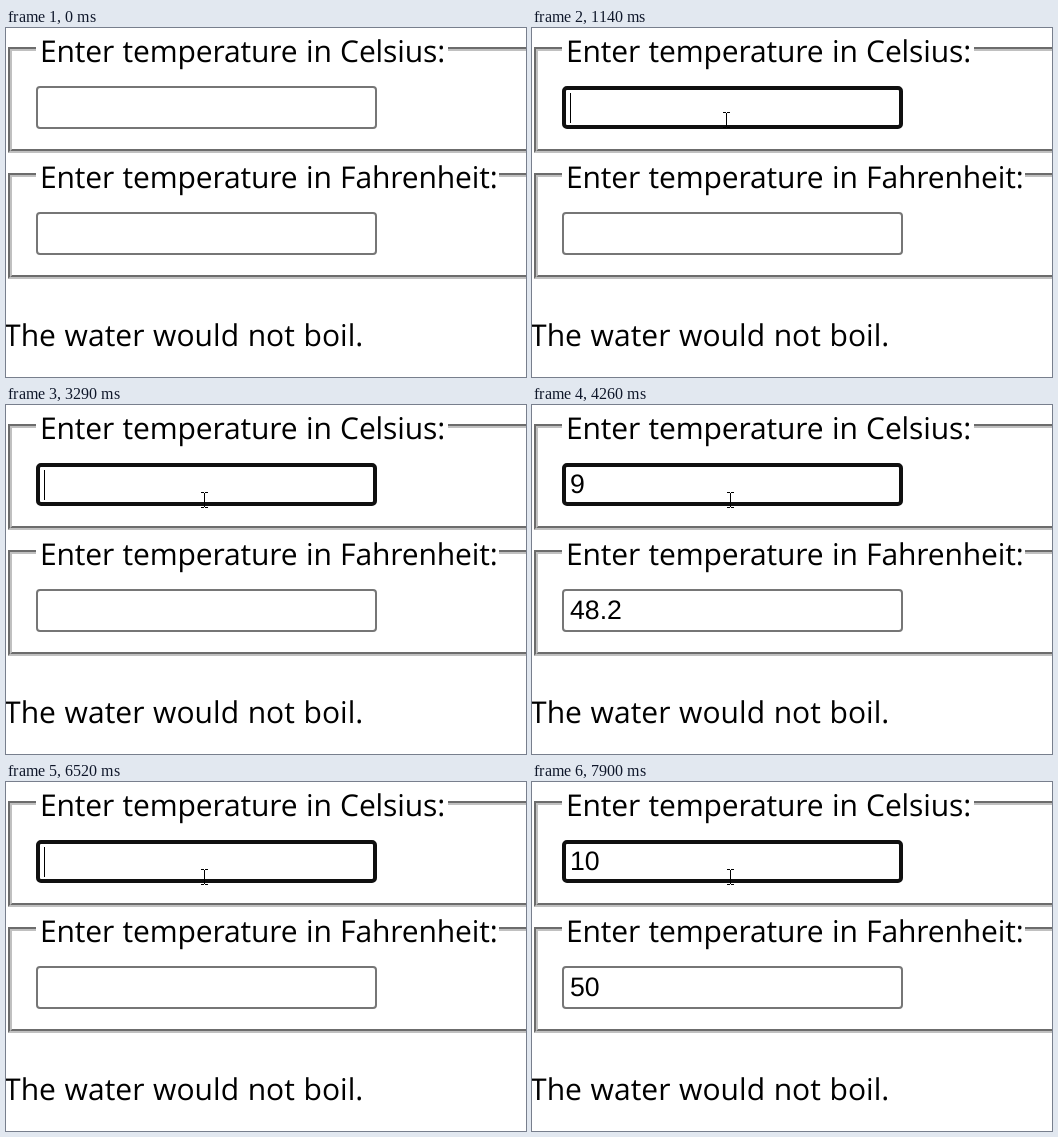
Recreate the animation shown at these times as an HTML page. Size 520x349 px, loop 8000 ms.

```html
<!DOCTYPE html>
<html lang="en">
<head>
<meta charset="utf-8">
<title>Temperature converter</title>
<style>
  html, body { margin: 0; width: 100%; height: 100%; overflow: hidden; background: #fff; }
  svg { display: block; width: 520px; height: 349px; }
  text { text-rendering: geometricPrecision; white-space: pre; }
  .label { font: 30px "Open Sans", "Noto Sans", sans-serif; letter-spacing: -.12px; word-spacing: .7px; }
  #verdict { letter-spacing: .05px; }
  .value { font: 26.667px "Liberation Sans", Arial, sans-serif; }
  .dark { fill: #6c6c6c; }
  .light { fill: #c0c0c0; }
  .box { fill: #fff; stroke: #767676; stroke-width: 2; }
  .box.hover { stroke: #4f4f4f; }
  .box.focus { stroke: #101010; stroke-width: 4; }
  #arrow { fill: #fff; stroke: #000; shape-rendering: crispEdges; }
  #beam { fill: none; stroke: #000; }
</style>
</head>
<body>
<svg viewBox="0 0 520 349">
  <defs>
    <!-- grooved border with mitred corners -->
    <g id="frame">
      <path class="light" d="M30 21H4V123L6 121V23H30ZM2 125L4 123H520V125Z"/>
      <path class="dark" d="M30 19H2V125L4 123V21H30ZM4 123L6 121H520V123Z"/>
    </g>
    <g id="edge">
      <path class="dark" d="M0 19H90V21H0Z"/>
      <path class="light" d="M0 21H90V23H0Z"/>
    </g>
  </defs>

  <use href="#frame"/>
  <use href="#edge" x="442"/>
  <text class="label" x="34" y="34">Enter temperature in Celsius:</text>
  <rect class="box" id="field"/>
  <text class="value" id="celsius" x="38" y="88"></text>
  <rect id="caret" width="1" height="30"/>

  <use href="#frame" y="126"/>
  <use href="#edge" x="493" y="126"/>
  <text class="label" x="34" y="160">Enter temperature in Fahrenheit:</text>
  <rect class="box" x="31" y="185" width="339" height="41" rx="3"/>
  <text class="value" id="fahrenheit" x="38" y="214"></text>

  <text class="label" id="verdict" x="-2" y="318"></text>

  <path id="arrow" d="M.5 .5V16.5L4.2 13L6.8 18.5H8.8L6.6 12H11.5Z"/>
  <path id="beam" d="M-3 -7.5H0M1 -7.5H4M-3 7.5H0M1 7.5H4M.5 -7V7"/>
</svg>
<script>
const LOOP = 8000, FOCUS = 1140, DIGIT = 14.83;

// [time, Celsius text]
const typing = [
  [0, ""], [3720, "9"], [4360, "99"], [6200, "9"], [6310, ""],
  [6730, "1"], [6940, "10"], [7150, "100"], [7900, "10"]
];

// [time, caret shown]
const blinks = [
  [0, false], [1140, true], [1680, false], [2210, true], [2750, false],
  [3290, true], [4260, false], [4360, true], [4900, false], [5450, true],
  [5990, false], [6520, true], [7690, false]
];

// [time, pointer shape, x, y]
const moves = [
  [0, "none", 0, 0], [310, "arrow", 222, 332], [410, "arrow", 207, 212],
  [510, "arrow", 202, 119], [610, "beam", 199, 98], [720, "beam", 196, 94],
  [820, "beam", 194, 92], [1790, "beam", 196, 93], [1890, "beam", 197, 94],
  [2000, "beam", 198, 95]
];

const el = id => document.getElementById(id);
const at = (steps, t) => steps.findLast(step => step[0] <= t);
const show = (id, on) => el(id).setAttribute("visibility", on ? "visible" : "hidden");

function set(id, attrs) {
  for (const name in attrs) el(id).setAttribute(name, attrs[name]);
}

function write(id, text) {
  if (el(id).textContent !== text) el(id).textContent = text;
}

function drawField(focused, hovered) {
  const inset = focused ? 2 : 1;
  set("field", {
    class: "box" + (focused ? " focus" : hovered ? " hover" : ""),
    x: 30 + inset, y: 58 + inset,
    width: 341 - 2 * inset, height: 43 - 2 * inset,
    rx: 3
  });
}

function draw(t) {
  const text = at(typing, t)[1];
  const [, shape, x, y] = at(moves, t);

  write("celsius", text);
  write("fahrenheit", text && String(Math.round(text * 18 + 320) / 10));
  write("verdict", `The water would ${text >= 100 ? "" : "not "}boil.`);

  drawField(t >= FOCUS, shape === "beam");
  set("caret", { x: Math.floor(38 + DIGIT * text.length), y: text ? 64 : 65 });
  show("caret", at(blinks, t)[1]);

  for (const id of ["arrow", "beam"]) {
    show(id, id === shape);
    set(id, { transform: `translate(${x} ${y})` });
  }
}

function tick() {
  draw(performance.now() % LOOP);
  requestAnimationFrame(tick);
}
tick();
</script>
</body>
</html>
```
